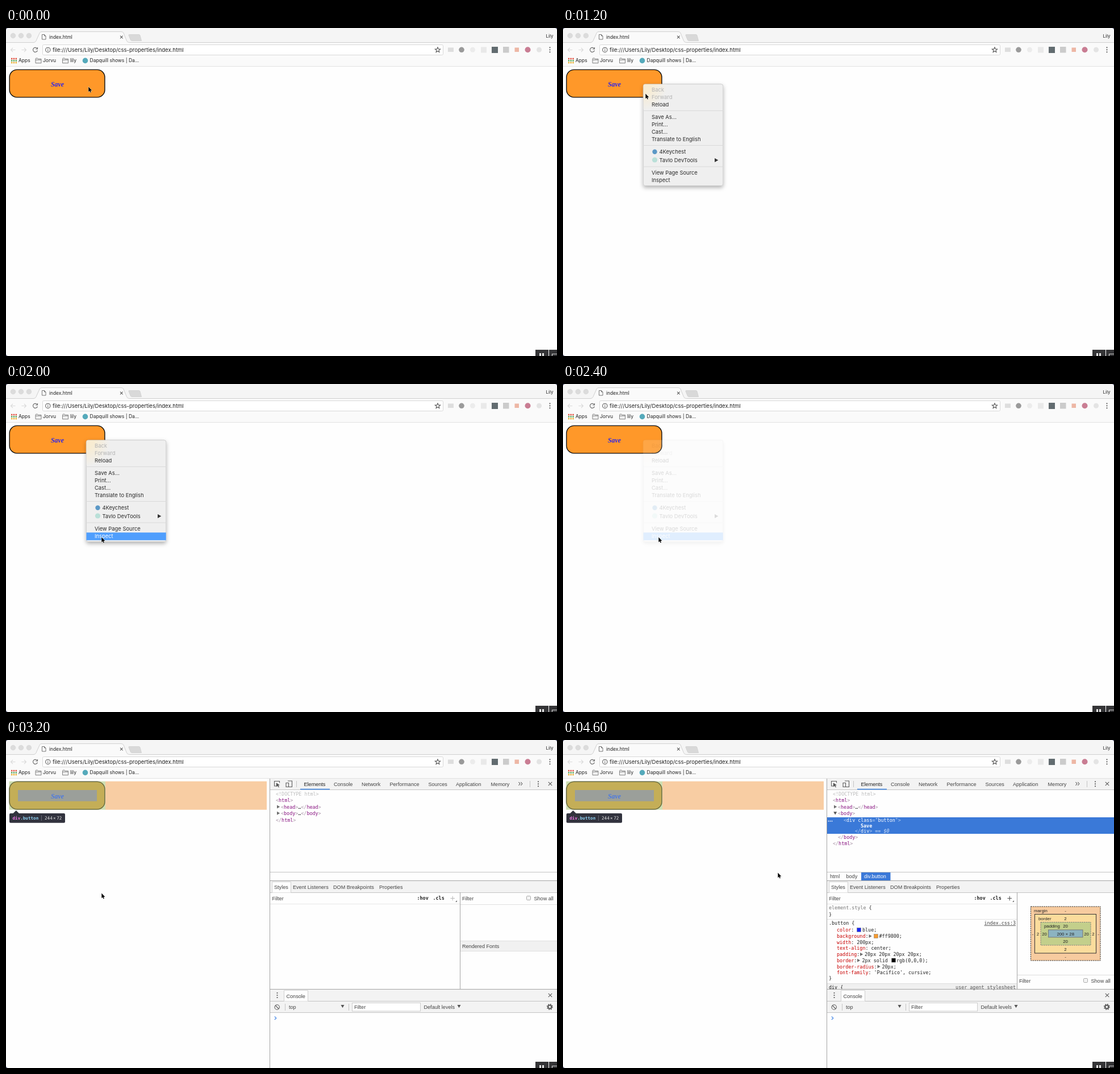
An HTML page for the animation above (4.8 s loop, 970 by 577 pixels).

```html
<!DOCTYPE html>
<html lang="en">
<head>
<meta charset="utf-8">
<title>Inspecting a button</title>
<style>
html, body { margin: 0; width: 100%; height: 100%; overflow: hidden; background: #fefefe; }
svg { display: block; width: 970px; height: 577px; }
text { white-space: pre; }
.ui { font-family: Inter, sans-serif; font-size: 8.5px; fill: #222; }
.menu { font-family: Inter, sans-serif; font-size: 9.4px; fill: #2b2b2b; }
.dt { font-family: "Liberation Sans", Arial, sans-serif; font-size: 9.1px; fill: #444; }
.mono { font-family: "DejaVu Sans Mono", monospace; font-size: 8.4px; fill: #222; }
.box text { font-size: 7.8px; fill: #222; text-anchor: middle; }
.box .name { text-anchor: start; }
.script { font: italic bold 11.8px Pacifico, "Liberation Serif", cursive; }
.off { fill: #b4b4b4; }
.white { fill: #fff; }
.br { fill: #a894a6; }
.tag { fill: #881280; }
.key { fill: #c80000; }
.line { stroke: #c4c4c4; fill: none; }
.dark { stroke: #a5a5a5; fill: none; }
.icon { fill: none; stroke: #5c5c5c; stroke-width: 1.1; }

/* One loop: each state holds until the next step */
.cursor, .ctx, .hl-source, .hl-inspect, .panel, .picked, .collapsed, .expanded, .loaded, .pending {
  animation: 4.8s step-end infinite;
}
.cursor { animation-name: cursor; }
.ctx { animation-name: ctx; }
.hl-source { animation-name: hl-source; }
.hl-inspect { animation-name: hl-inspect; }
.panel { animation-name: panel; }
.picked { animation-name: picked; }
.collapsed { animation-name: collapsed; }
.expanded { animation-name: expanded; }
.loaded { animation-name: loaded; }
.pending { animation-name: pending; }
@keyframes cursor {
  0% { transform: translate(145px, 103px); }
  4.1667% { transform: translate(141px, 98px); }
  25% { transform: translate(145px, 115px); }
  29.1667% { transform: translate(169px, 247px); }
  33.3333% { transform: translate(172px, 255px); }
  37.5% { transform: translate(168px, 269px); }
  83.3333% { transform: translate(180px, 267px); }
  87.5% { transform: translate(262px, 252px); }
  91.6667% { transform: translate(352px, 237px); }
  95.8333%, 100% { transform: translate(378px, 233px); }
}
@keyframes ctx { 0% { opacity: 0; } 16.6667% { opacity: 1; } 50% { opacity: .17; } 54.1667%, 100% { opacity: 0; } }
@keyframes hl-source { 0% { opacity: 0; } 33.3333% { opacity: 1; } 37.5%, 100% { opacity: 0; } }
@keyframes hl-inspect { 0% { opacity: 0; } 37.5%, 100% { opacity: 1; } }
@keyframes panel { 0% { opacity: 0; } 62.5%, 100% { opacity: 1; } }
@keyframes picked { 0% { opacity: 0; } 66.6667%, 100% { opacity: 1; } }
@keyframes collapsed { 0% { opacity: 0; } 66.6667% { opacity: 1; } 70.8333%, 100% { opacity: 0; } }
@keyframes expanded { 0% { opacity: 0; } 70.8333%, 100% { opacity: 1; } }
@keyframes loaded { 0% { opacity: 0; } 75%, 100% { opacity: 1; } }
@keyframes pending { 0% { opacity: 1; } 75%, 100% { opacity: 0; } }
</style>
</head>
<body>
<svg viewBox="0 0 970 577">
  <defs>
    <path id="tri" d="M0 -3L5.2 0L0 3Z" fill="#6e6e6e"/>
    <path id="down" d="M-3 -2.6H3L0 2.8Z" fill="#555"/>
    <path id="cross" d="M-3.2 -3.2L3.2 3.2M3.2 -3.2L-3.2 3.2"/>
    <g id="dots"><circle cy="-4" r="1.1"/><circle r="1.1"/><circle cy="4" r="1.1"/></g>
    <path id="folder" d="M.5 2V9.3H10.5V2H5L4 .6H1.2ZM.5 3.6H10.5" fill="#f0f0f0" stroke="#777" stroke-width=".9"/>
    <rect id="button" x="6.2" y="73.4" width="167.7" height="48.5" rx="13.2" stroke-width="1.4"/>
    <radialGradient id="glow" cx="0" cy="0" r="1">
      <stop offset=".3" stop-color="#f8ecd2"/><stop offset="1" stop-color="#efefef"/>
    </radialGradient>
    <filter id="shadow" x="-20%" y="-20%" width="140%" height="140%">
      <feDropShadow dx="0" dy="3" stdDeviation="3.5" flood-opacity=".3"/>
    </filter>
  </defs>

  <!-- Browser frame -->
  <rect width="970" height="577" fill="#fefefe"/>
  <rect width="970" height="26" fill="#f5f5f5"/>
  <rect y="25" width="970" height="42" fill="#fafafa"/>
  <path d="M0 25.5H49Q52 25 53 22.5L59.3 8.5Q60.3 6.5 63 6.5H203Q206 6.5 207 9L212.5 22.5Q213.5 25 216.5 25.5H970" fill="#fafafa" stroke="#d0d0d0"/>
  <path d="M0 67.5H970" stroke="#e2e2e2"/>
  <path d="M217 11.5H234Q235.5 11.5 236 13L238.5 22.5H222Q220 22.5 219.3 21L216 13Q215.5 11.5 217 11.5Z" fill="#d9d9d9" stroke="#cdcdcd" stroke-width=".7"/>
  <g fill="#dcdcdc" stroke="#d2d2d2" stroke-width=".6">
    <circle cx="12.5" cy="13.5" r="4.3"/><circle cx="26.5" cy="13.5" r="4.3"/><circle cx="40.4" cy="13.5" r="4.3"/>
  </g>
  <path d="M63.5 11.5H67.5L70 14V20H63.5ZM67.5 11.5V14H70" fill="#fff" stroke="#666" stroke-width=".9"/>
  <use href="#cross" transform="translate(203.3 16) scale(.72)" stroke="#555" stroke-width="1.4"/>
  <g class="ui">
    <text x="76" y="18.8" style="font-size:8.4px">index.html</text>
    <text x="950.5" y="16.7" style="font-size:8px">Lily</text>
    <text x="22" y="60.3">Apps</text>
    <text x="65" y="60.3">Jorvu</text>
    <text x="113" y="60.3">lily</text>
    <text x="147.5" y="60.3">Dapquill shows | Da...</text>
  </g>

  <g class="icon" style="stroke:#dadada">
    <path d="M16.5 38.5H8.5M12 35L8.5 38.5L12 42M27.5 38.5H35.5M32 35L35.5 38.5L32 42"/>
    <path d="M54.6 35.8A4 4 0 1 0 55.4 39.5M55.5 34V37H52.3" stroke="#666"/>
  </g>
  <rect x="64.5" y="29.5" width="705" height="18" rx="2" fill="#fff" stroke="#d8d8d8"/>
  <circle cx="73.8" cy="38.4" r="4.1" class="icon"/>
  <path d="M73.8 37.7V40.7M73.8 35.8V36.9" class="icon"/>
  <text class="ui" x="82" y="41.8" style="font-size:9.5px">file:///Users/Lily/Desktop/css-properties/index.html</text>
  <path class="icon" d="M760 33.8L761.3 36.9L764.6 37.1L762 39.2L762.9 42.5L760 40.7L757.1 42.5L758 39.2L755.4 37.1L758.7 36.9Z"/>
  <rect x="778" y="34.5" width="10" height="7.5" fill="#dedede"/>
  <circle cx="802" cy="38.3" r="4.8" fill="#9a9a9a"/>
  <circle cx="821.5" cy="38.3" r="4.5" fill="#ececec"/>
  <rect x="836" y="33.5" width="10" height="10" fill="#e9e9e9"/>
  <rect x="855" y="33" width="11" height="11" fill="#626c70"/>
  <rect x="875" y="33" width="10.5" height="10.5" fill="#cbcbcb"/>
  <rect x="895.5" y="34.5" width="7.5" height="7.5" fill="#edb7a5"/>
  <circle cx="918.5" cy="38.3" r="5" fill="#c97d93"/>
  <circle cx="938.5" cy="38.3" r="4.5" fill="#e4e4e4"/>
  <use href="#dots" x="957.5" y="38.3" fill="#555"/>

  <g stroke-width="2.4" stroke-dasharray="2.4 1.4">
    <path d="M9 54H19" stroke="#e24d3e"/><path d="M9 57.5H19" stroke="#57a65b"/><path d="M9 61H19" stroke="#e9ad2f"/>
  </g>
  <use href="#folder" x="51.5" y="52.5"/>
  <use href="#folder" x="99" y="52.5"/>
  <circle cx="139.5" cy="57.4" r="4.8" fill="#55aabb"/>

  <!-- Page button -->
  <use href="#button" fill="#ff9829" stroke="#0a0a0a"/>
  <text class="script" x="79" y="102.5" fill="#2a22ee">Save</text>

  <g class="picked">
    <rect x="175" y="72.7" width="284" height="50" fill="#f8cda3"/>
    <rect x="5.5" y="72.7" width="169.5" height="50" fill="#cfdfb2"/>
    <use href="#button" fill="#c4ae57" stroke="#69683d"/>
    <rect x="21" y="88" width="139" height="19.7" fill="#9b9f9a"/>
    <text class="script" x="79" y="102.5" fill="#4a78e2">Save</text>
    <path d="M8 129H12.5L17.8 124L23 129H102Q104 129 104 131V144Q104 145.7 102 145.7H8Q6 145.7 6 144V131Q6 129 8 129Z" fill="#32333e"/>
    <path d="M62.5 132.5V142" stroke="#666874"/>
    <g class="mono" style="font-size:7.6px">
      <text x="11.5" y="139.7" font-weight="bold" style="fill:#ee78e6">div<tspan fill="#8fd3f5">.button</tspan></text>
      <text x="68" y="139.7" style="fill:#e6e6e6">244<tspan x="83">×</tspan><tspan x="89.3">72</tspan></text>
    </g>
  </g>

  <!-- Context menu -->
  <g class="ctx">
    <rect x="141.3" y="98.7" width="140.5" height="178.8" rx="3.5" fill="#efefef" stroke="#bdbdbd" stroke-width=".7" filter="url(#shadow)"/>
    <rect x="141.7" y="99" width="42" height="46" rx="3" fill="url(#glow)"/>
    <path d="M141.5 145.5H281.5M141.5 206.5H281.5M141.5 244H281.5" stroke="#dadada"/>
    <g class="menu">
      <text class="off" x="156" y="111.5">Back</text>
      <text class="off" x="156" y="124.8">Forward</text>
      <text x="156" y="138">Reload</text>
      <text x="156" y="159.5">Save As...</text>
      <text x="156" y="172.7">Print...</text>
      <text x="156" y="186">Cast...</text>
      <text x="156" y="199.2">Translate to English</text>
      <text x="169.5" y="221.2">4Keychest</text>
      <text x="169.5" y="235.7">Tavlo DevTools</text>
      <text x="156" y="258">View Page Source</text>
      <text x="156" y="271.3">Inspect</text>
    </g>
    <circle cx="161.5" cy="217.7" r="4.2" fill="#5b98c6"/>
    <circle cx="161.5" cy="232" r="4.6" fill="#b9e0d8"/>
    <path d="M267 229V236L273.3 232.5Z" fill="#333"/>
    <g class="hl-source">
      <rect x="141.5" y="248" width="140.2" height="13.5" fill="#4f9efd"/>
      <text class="menu white" x="156" y="258" style="fill:#fff">View Page Source</text>
    </g>
    <g class="hl-inspect">
      <rect x="141.5" y="261.3" width="140.2" height="13.5" fill="#4f9efd"/>
      <text class="menu white" x="156" y="271.3">Inspect</text>
    </g>
  </g>

  <!-- Developer tools -->
  <g class="panel">
    <rect x="465" y="68" width="505" height="509" fill="#fefefe"/>
    <path d="M465 68H970V88H465ZM465 248H970V268H465ZM465 439H970V480H465Z" fill="#f3f3f3"/>
    <path class="line" d="M465 87.5H970M465 232.5H970M465 268.5H970M465 459.5H970M465 479.5H970M511.5 72V83M922.5 72V83M491.5 464V476M603.5 464V476"/>
    <path class="line" d="M465 288.5H799" style="stroke:#e8e8e8"/>
    <path class="dark" d="M464.5 68V577M465 247.5H970M465 438.5H970M799.5 268V438"/>
    <path d="M518 86.7H570" stroke="#4a8be0" stroke-width="1.8"/>
    <path d="M468.5 268.5V249.5H501.5V268.5M489.5 459.5V440.5H531.5V459.5" fill="#fefefe" stroke="#d0d0d0"/>
    <rect x="609.5" y="462.5" width="120" height="14.5" fill="#fff" stroke="#ccc"/>

    <g class="icon">
      <path d="M476 81H472.5V72.5H481.5V75.5"/>
      <path d="M475.8 75.2V82.5L477.9 80.7L480 83.5L481 82.7L479.3 80L482 79.5Z" fill="#555" stroke="none"/>
      <path d="M496 72H503.5V82.5H497.5M493 75.5H497.5V82.5H493Z"/>
      <path d="M902.5 74L905 77L902.5 80M906.3 74L908.8 77L906.3 80"/>
      <use href="#cross" x="958" y="77"/>
      <use href="#cross" x="958" y="449"/>
      <circle cx="477.2" cy="470" r="4.2"/><path d="M474.3 467L480.1 473"/>
      <circle cx="957.3" cy="469.5" r="3" style="stroke-width:2.2"/>
      <circle cx="957.3" cy="469.5" r="4.7" style="stroke-width:1.6" stroke-dasharray="1.85 1.85"/>
      <path d="M472.8 486.5L475.8 489.2L472.8 492" stroke="#3f83e6"/>
    </g>
    <g fill="#555"><use href="#dots" x="937" y="77.3"/><use href="#dots" x="477.5" y="449"/></g>
    <use href="#down" x="592.5" y="468.5"/>
    <use href="#down" x="797.5" y="468.5"/>

    <g class="dt">
      <text x="524.5" y="80.5" fill="#222">Elements</text>
      <text x="577" y="80.5">Console</text>
      <text x="626" y="80.5">Network</text>
      <text x="675.5" y="80.5">Performance</text>
      <text x="743.5" y="80.5">Sources</text>
      <text x="792" y="80.5">Application</text>
      <text x="853.5" y="80.5">Memory</text>
      <text x="472" y="262.2">Styles</text>
      <text x="505" y="262.2">Event Listeners</text>
      <text x="576" y="262.2">DOM Breakpoints</text>
      <text x="657" y="262.2">Properties</text>
      <text x="468.5" y="281.7">Filter</text>
      <text x="493.5" y="453.7">Console</text>
      <text x="498" y="473">top</text>
      <text x="613" y="473">Filter</text>
      <text x="735.5" y="473">Default levels</text>
    </g>
    <g class="mono" font-weight="bold">
      <text x="723.5" y="281">:hov</text><text x="751.5" y="281">.cls</text>
    </g>
    <path d="M782.5 278.5H790M786.3 274.7V282.3" stroke="#b8b8b8"/>
    <path d="M794 282V285H791Z" fill="#777"/>

    <g class="pending dt">
      <text x="803" y="282.2">Filter</text>
      <text x="929.5" y="282.2">Show all</text>
      <rect x="916.5" y="274.5" width="7" height="7" rx="1.2" fill="#f4f4f4" stroke="#aaa"/>
      <rect x="800" y="353.5" width="170" height="18" fill="#f1f1f1"/>
      <path d="M800 289.5H970M800 353.5H970M800 371.5H970" stroke="#e0e0e0"/>
      <text x="803" y="365.7">Rendered Fonts</text>
    </g>

    <g class="picked mono">
      <text x="475" y="98" style="fill:#bdbdbd">&lt;!DOCTYPE html&gt;</text>
      <text x="475" y="109.2" class="br">&lt;<tspan class="tag">html</tspan>&gt;</text>
      <use href="#tri" x="477" y="117.5"/>
      <text x="484" y="120.7" class="br">&lt;<tspan class="tag">head</tspan>&gt;<tspan fill="#222">…</tspan>&lt;/<tspan class="tag">head</tspan>&gt;</text>
    </g>
    <g class="collapsed mono">
      <use href="#tri" x="477" y="128.8"/>
      <text x="484" y="132" class="br">&lt;<tspan class="tag">body</tspan>&gt;<tspan fill="#222">…</tspan>&lt;/<tspan class="tag">body</tspan>&gt;</text>
      <text x="475" y="143.5" class="br">&lt;/<tspan class="tag">html</tspan>&gt;</text>
    </g>
    <g class="expanded mono">
      <use href="#down" x="479.2" y="128.8"/>
      <text x="484" y="132" class="br">&lt;<tspan class="tag">body</tspan>&gt;</text>
      <rect x="465" y="136" width="505" height="29" fill="#3a79d8"/>
      <g fill="#fff"><circle cx="467.5" cy="142.7" r=".9"/><circle cx="470.5" cy="142.7" r=".9"/><circle cx="473.5" cy="142.7" r=".9"/></g>
      <text x="494" y="143.7" style="fill:#b4cdf2">&lt;<tspan class="white">div class</tspan>="<tspan class="white">button</tspan>"&gt;</text>
      <text x="524" y="153.5" class="white" font-weight="bold">Save</text>
      <text x="514" y="163" style="fill:#b4cdf2">&lt;/<tspan class="white">div</tspan>&gt;<tspan font-style="italic" fill="#d5e3f8"> == $0</tspan></text>
      <text x="484" y="173.5" class="br">&lt;/<tspan class="tag">body</tspan>&gt;</text>
      <text x="475" y="184.5" class="br">&lt;/<tspan class="tag">html</tspan>&gt;</text>
      <rect x="525" y="233" width="51.5" height="14" fill="#3a79d8"/>
      <g class="dt">
        <text x="470" y="243">html</text><text x="498.5" y="243">body</text>
        <text x="530" y="243" class="white">div.button</text>
      </g>
      <path d="M782.5 278.5H790M786.3 274.7V282.3" stroke="#555"/>
    </g>

    <!-- Style rules and box model -->
    <g class="loaded">
      <g class="mono">
        <text x="468" y="298" style="fill:#777">element.style <tspan fill="#222">{</tspan></text>
        <text x="468" y="310">}</text>
        <path d="M465 315.5H799" stroke="#e2e2e2"/>
        <text x="468" y="325.2">.button {</text>
        <text x="797" y="325.2" text-anchor="end" text-decoration="underline" style="fill:#444">index.css:3</text>
        <text x="482" y="337"><tspan class="key">color</tspan>:<tspan x="527">blue;</tspan></text>
        <text x="482" y="348"><tspan class="key">background</tspan>:<tspan x="556.5">#ff9800;</tspan></text>
        <text x="482" y="358.7"><tspan class="key">width</tspan>: 200px;</text>
        <text x="482" y="369.3"><tspan class="key">text-align</tspan>: center;</text>
        <text x="482" y="380"><tspan class="key">padding</tspan>:<tspan x="531">20px 20px 20px 20px;</tspan></text>
        <text x="482" y="390.7"><tspan class="key">border</tspan>:<tspan x="526.5">2px solid</tspan><tspan x="587">rgb(0,0,0);</tspan></text>
        <text x="482" y="401.5"><tspan class="key">border-radius</tspan>:<tspan x="561.5">20px;</tspan></text>
        <text x="482" y="412"><tspan class="key">font-family</tspan>: 'Pacifico', cursive;</text>
        <text x="468" y="422">}</text>
        <rect x="465" y="428.5" width="334" height="9.5" fill="#f0f0f0"/>
        <path d="M465 428.5H799" stroke="#dedede"/>
        <text x="468" y="437.5">div {</text>
        <text x="797" y="437.5" text-anchor="end" style="fill:#555">user agent stylesheet</text>
      </g>
      <g stroke="#777" stroke-width=".5">
        <rect x="517.5" y="330.5" width="7" height="7" fill="#1726f5"/>
        <rect x="547.5" y="341.5" width="7" height="7" fill="#f59a2f"/>
        <rect x="578.5" y="384" width="7" height="7"/>
      </g>
      <use href="#tri" x="538.5" y="345"/><use href="#tri" x="523" y="377"/>
      <use href="#tri" x="518" y="387.7"/><use href="#tri" x="553.5" y="398.5"/>
      <path d="M465 438.5H970" class="dark"/>

      <g stroke="#333">
        <rect x="823.5" y="293" width="122.5" height="95" fill="#f7cb9f" stroke-dasharray="2.5 1.3"/>
        <rect x="830.5" y="306.5" width="108" height="68.5" fill="#fbdc9c"/>
        <rect x="841" y="320.5" width="88" height="40.5" fill="#c3cf8b" stroke="#808080" stroke-dasharray="2.5 1.3"/>
        <rect x="854.5" y="334" width="60.5" height="13" fill="#8cb3c1" stroke="#777"/>
      </g>
      <g class="dt box">
        <text class="name" x="829" y="302.5">margin</text><text x="884.5" y="302.5">-</text>
        <text class="name" x="837" y="316.5">border</text><text x="884.5" y="316.5">2</text>
        <text class="name" x="847" y="330">padding</text><text x="884.5" y="330">20</text>
        <text x="827" y="343.5">-</text><text x="836" y="343.5">2</text><text x="847.5" y="343.5">20</text>
        <text x="884.7" y="343.5">200 × 28</text>
        <text x="921.5" y="343.5">20</text><text x="933.5" y="343.5">2</text><text x="942.5" y="343.5">-</text>
        <text x="884.5" y="357.3">20</text><text x="884.5" y="370.5">2</text><text x="884.5" y="384">-</text>
      </g>
      <path d="M800 413.5H970" stroke="#dcdcdc"/>
      <g class="dt">
        <text x="803" y="427.2">Filter</text><text x="929.5" y="427.2">Show all</text>
        <rect x="916.5" y="419.5" width="7" height="7" rx="1.2" fill="#f4f4f4" stroke="#aaa"/>
      </g>
    </g>
  </g>

  <!-- Recorder controls and window corners -->
  <path d="M932 566H955V577H932ZM956 566H970V577H956Z" fill="#343436"/>
  <path d="M939 572H942V577H939ZM944 572H947V577H944Z" fill="#e4e4e4"/>
  <path d="M961.5 577V573.5H970" fill="none" stroke="#ccc" stroke-width="1.2"/>
  <path d="M0 0H3Q.5 .5 0 3ZM970 0V3Q969.5 .5 967 0ZM0 577V574Q.5 576.5 3 577Z" fill="#3c4160"/>

  <path class="cursor" d="M.3 .5V9.2L2.2 7.4L3.5 10.4L4.9 9.8L3.7 6.9H6.3Z" fill="#050505" stroke="#fff" stroke-width=".8" stroke-linejoin="round" paint-order="stroke"/>
</svg>
</body>
</html>
```
